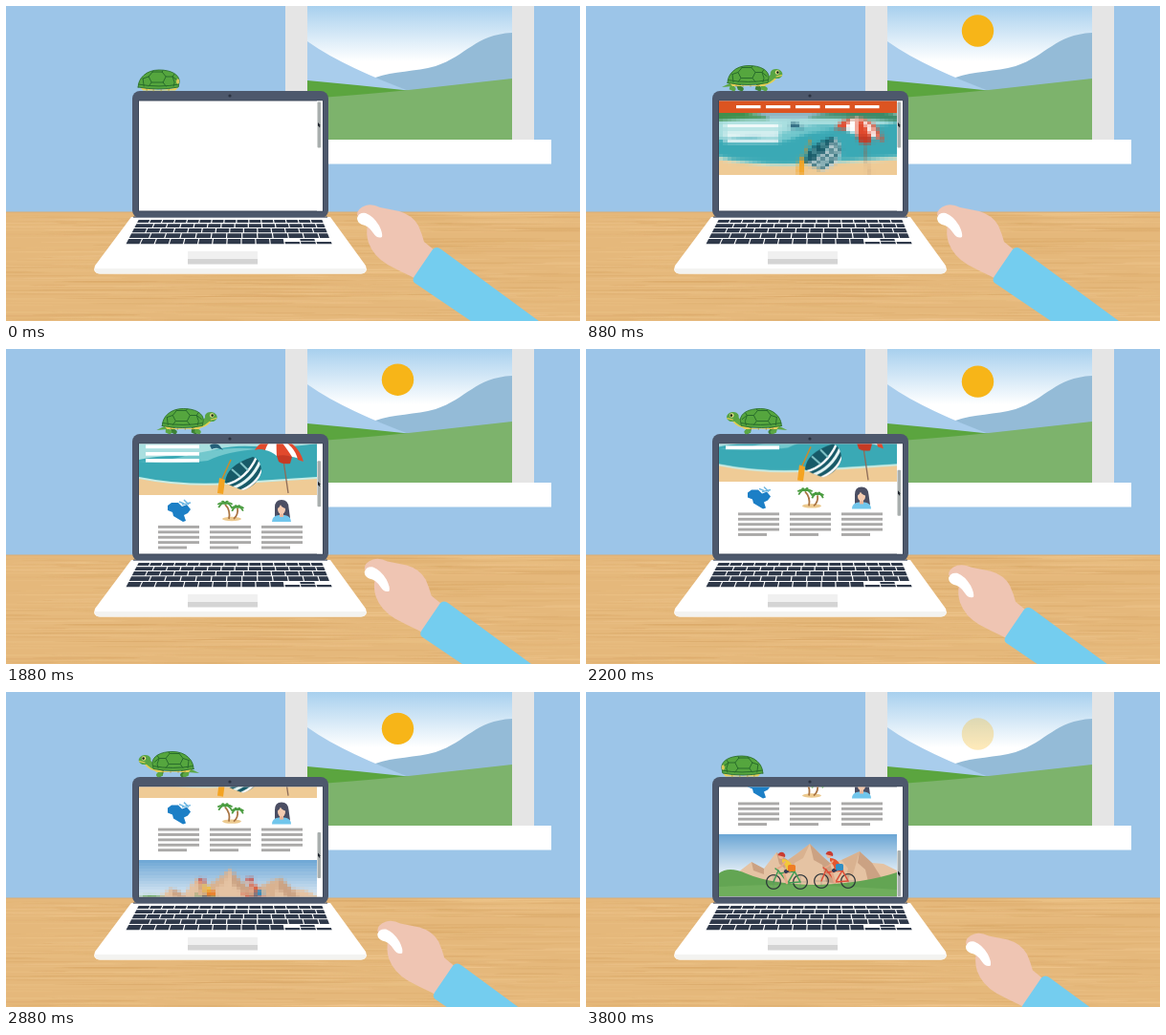
An HTML page with a canvas that plays this animation: 600x330 px, repeating every 3840 ms.

```html
<!DOCTYPE html>
<html lang="en">
<head>
<meta charset="utf-8">
<title>Loading page</title>
<style>
html, body { margin: 0; width: 100%; height: 100%; overflow: hidden; }
canvas { display: block; width: 600px; height: 330px; }
</style>
</head>
<body>
<canvas id="stage" width="600" height="330"></canvas>
<script>
const LOOP = 3840, STEP = 40;
const PIC_W = 186, PIC_H = 65;
const stage = document.getElementById('stage').getContext('2d');

const clamp = v => Math.max(0, Math.min(1, v));
const ramp = (t, from, to) => clamp((t - from) / (to - from));
const ease = v => v * v * (3 - 2 * v);

function makeLayer(w, h) {
  const c = document.createElement('canvas');
  c.width = w;
  c.height = h;
  return c.getContext('2d');
}
function shape(g, path, color) {
  g.fillStyle = color;
  g.fill(new Path2D(path));
}
function line(g, path, color, width) {
  g.strokeStyle = color;
  g.lineWidth = width;
  g.stroke(new Path2D(path));
}
function rect(g, x, y, w, h, color) {
  g.fillStyle = color;
  g.fillRect(x, y, w, h);
}
function oval(g, x, y, rx, ry, color, turn = 0) {
  g.fillStyle = color;
  g.beginPath();
  g.ellipse(x, y, rx, ry, turn, 0, Math.PI * 2);
  g.fill();
}
function box(g, x, y, w, h, r, color) {
  g.fillStyle = color;
  g.beginPath();
  g.roundRect(x, y, w, h, r);
  g.fill();
}
function fade(g, y0, y1, from, to) {
  const f = g.createLinearGradient(0, y0, 0, y1);
  f.addColorStop(0, from);
  f.addColorStop(1, to);
  return f;
}
function seeded(seed) {
  return () => (seed = (seed * 16807) % 2147483647) / 2147483647;
}

// Room without the sun and everything that sits in front of the desk
function paintDesk(g) {
  const rnd = seeded(41);
  rect(g, 0, 216, 600, 114, '#e5b87b');
  for (let i = 0; i < 420; i++) {
    const dark = rnd() < 0.5;
    g.globalAlpha = 0.1 + rnd() * 0.18;
    oval(g, rnd() * 600, 217 + rnd() * 113, 20 + rnd() * 70, 0.4 + rnd() * 0.6,
      dark ? '#cf9a58' : '#f2cd98');
  }
  g.globalAlpha = 1;
  rect(g, 0, 215.5, 600, 1, '#dcae74');
}
function paintRoom(g) {
  rect(g, 0, 0, 600, 216, '#9cc5e8');
  paintDesk(g);
  rect(g, 292, 0, 260, 140, '#e5e5e5');
  rect(g, 292, 140, 278, 25.5, '#ffffff');
  rect(g, 315, 0, 214, 140, fade(g, 0, 58, '#a8d0ee', '#ffffff'));
}
function paintHills(g) {
  shape(g, 'M386 75C405 68 428 69 449 63C482 52 490 30 529 28V100H386Z', '#94bbd7');
  shape(g, 'M315 37C345 58 382 74 421 89L400 100H315Z', '#a9cdec');
  shape(g, 'M315 78Q370 83 425 89L380 100H315Z', '#5ba53f');
  shape(g, 'M315 97Q385 92 430 87T529 76V140H315Z', '#7db36c');
}

function paintLaptop(g) {
  box(g, 132, 89, 205, 133, 8, '#4d586c');
  box(g, 138, 98.5, 194, 117, 1, '#3c4658');
  oval(g, 234, 94, 1.6, 1.6, '#2b3342');
  shape(g, 'M131 221H339L376 272Q379 280 371 280.5H98Q90 280 93 272Z', '#ffffff');
  shape(g, 'M93 275H376.5Q376 280.5 371 280.5H98Q93 280.5 93 275Z', '#f3f3f1');
  rect(g, 133, 220.5, 203, 1.2, '#4d586c');

  const edge = (y, u) => {
    const left = 138 - (y - 224) * 0.52, right = 331 + (y - 224) * 0.4;
    return left + (right - left) * u;
  };
  const key = (y, h, a, b) => {
    const x = (v, u, gap) => (edge(v, u) + gap).toFixed(2);
    shape(g, `M${x(y, a, .6)} ${y}L${x(y, b, -.6)} ${y}L${x(y + h, b, -.6)} ${y + h}L${x(y + h, a, .6)} ${y + h}Z`, '#2f394a');
  };
  [[224, 3, 15], [228.3, 3.7, 14], [233, 4.2, 14], [238.3, 4.6, 13]].forEach(([y, h, n], row) => {
    for (let i = 0; i < n; i++) {
      const shift = i && row % 2 ? 0.025 : 0;
      key(y, h, i / n + shift, Math.min(1, (i + 1) / n + (row % 2 ? 0.025 : 0)));
    }
  });
  for (let i = 0; i < 11; i++) key(244, 5.2, i * 0.07, (i + 1) * 0.07);
  for (let i = 0; i < 3; i++) key(247, 2.2, 0.77 + i * 0.077, 0.77 + (i + 1) * 0.077);
  key(244, 2.2, 0.847, 0.924);

  rect(g, 190, 257, 73, 13, '#f0f0f0');
  rect(g, 190, 265, 73, 5.5, '#d4d4d4');
}

// Pictures on the web page, in their own 186 by 65 space
function paintBeach(g) {
  rect(g, 0, 0, PIC_W, PIC_H, '#a9dfe0');
  rect(g, 0, 0, PIC_W, 5, '#cfe7f0');
  shape(g, 'M40 0H150L162 6H30Z', '#8fb6c4');
  shape(g, 'M0 0H24Q42 1 53 7Q25 6 0 9Z', '#3f8f4d');
  shape(g, 'M92 6Q110 0 128 1Q160 -3 186 2V10Q150 5 92 6Z', '#3c8a68');
  shape(g, 'M0 28Q28 22 58 25Q85 12 120 14T186 11V55H0Z', '#3aa9b5');
  shape(g, 'M50 24Q90 13 125 17Q92 19 72 29Q40 33 0 30Q25 30 50 24Z', '#73c8cd');
  shape(g, 'M0 46Q45 55 92 52T186 46V65H0Z', '#c9ece4');
  shape(g, 'M0 48Q45 57 92 54T186 48V65H0Z', '#efcb96');
  shape(g, 'M74 13Q79 9 84 13L88 18Q81 14 76 17Z', '#245f78');
  [12.5, 20, 27].forEach(y => rect(g, 7, y, 56, 3.7, '#ffffff'));

  line(g, 'M96 28L86 50', '#d28a25', 1.5);
  shape(g, 'M84 47L90 49L88 64L82 63Z', '#f4a321');
  g.save();
  const hull = new Path2D('M90 52Q91 34 119 25Q128 28 128 41Q124 55 109 60Q99 57 90 52Z');
  g.fillStyle = '#175a68';
  g.fill(hull);
  g.clip(hull);
  line(g, 'M91 54Q112 49 123 25', '#ffffff', 2.4);
  line(g, 'M97 58Q118 51 127 29', '#e6f6f5', 3);
  line(g, 'M105 61Q123 54 129 38', '#ffffff', 2.4);
  line(g, 'M97 38L106 46M106 31L114 39', '#82c4c8', 2);
  g.restore();

  line(g, 'M150 22L156 63', '#8d6c58', 1.3);
  const rim = [[121, 18], [132, 18], [144, 24], [160, 25], [172, 30]];
  for (let i = 0; i < 4; i++) {
    const [ax, ay] = rim[i], [bx, by] = rim[i + 1];
    const bend = i * 8 + 127;
    shape(g, `M145 5Q${bend} ${7 + (i > 2 ? 4 : 0)} ${ax} ${ay}Q${(ax + bx) / 2} ${(ay + by) / 2 - 2} ${bx} ${by}Q${bend + 9} 10 145 5Z`,
      i % 2 ? '#ffffff' : '#e2492c');
  }
  shape(g, 'M145 5Q166 9 172 30L166 28Q163 13 145 5Z', '#e2492c');
  shape(g, 'M144 24Q152 22 160 25L158 32Q150 33 146 30Z', '#c63a24');
}

function paintBike(g, x, y, frame, shirt, bag) {
  g.save();
  g.translate(x, y);
  g.lineCap = 'round';
  for (const wx of [0, 28]) {
    g.strokeStyle = '#293238';
    g.lineWidth = 1.2;
    g.beginPath();
    g.arc(wx, 0, 7.3, 0, 7);
    g.stroke();
    line(g, `M${wx - 6} 0H${wx + 6}M${wx} -6V6`, '#6f7f76', 0.35);
  }
  line(g, 'M0 0L5 -12L15 1L22 -11L6 -9M15 1L28 0L22 -11M5 -12L2 -14', frame, 1.4);
  line(g, 'M19 -13L11 -8L14 1', '#e8a988', 2.6);
  line(g, 'M19 -14L13 -11', '#343b55', 4);
  shape(g, 'M9 -24Q18 -24 21 -13L14 -12Q13 -17 9 -21Z', shirt);
  line(g, 'M12 -21L8 -16L4 -14', '#e8a988', 1.6);
  oval(g, 8, -27, 2.7, 3, '#efb594');
  shape(g, 'M4.5 -28Q6 -32 10 -31Q13 -29 12 -26Z', '#c93c31');
  box(g, 15, -18, 8, 7, 2, bag);
  g.restore();
}
function paintRide(g) {
  rect(g, 0, 0, PIC_W, PIC_H, fade(g, 0, 46, '#6ba6d5', '#f4f8fb'));
  shape(g, 'M12 46L34 29L47 36L60 19L72 27L82 20L95 10L108 23L116 30L128 27L147 18L160 30L172 31L186 38V65H12Z', '#e5c3a3');
  shape(g, 'M95 10L99 27L108 32L112 50L122 52L116 30L108 23ZM147 18L145 30L153 37L156 50L170 46L160 30ZM60 19L63 31L70 37L72 27ZM34 29L36 38L47 42V36Z', '#cba283');
  shape(g, 'M95 10L88 25L79 30L76 40L66 42L72 27L82 20ZM128 27L135 36L132 48L140 42L147 18Z', '#d9b290');
  shape(g, 'M0 41Q10 33 28 41Q56 53 104 53Q153 51 186 40V65H0Z', '#63a553');
  shape(g, 'M0 55Q75 50 186 58V65H0Z', '#6fae5c');
  paintBike(g, 57, 50, '#3d9b52', '#f3c83a', '#ef7d25');
  paintBike(g, 107, 49, '#dc4a34', '#e4552f', '#2f8fc5');
}

function makePicture(paint) {
  const g = makeLayer(PIC_W * 2, PIC_H * 2);
  g.scale(2, 2);
  paint(g);
  return g.canvas;
}
const beach = makePicture(paintBeach);
const ride = makePicture(paintRide);
const coarse = makeLayer(PIC_W, PIC_H);

// Shows a picture built from blocks of the given size
function showPicture(g, picture, y, block) {
  g.save();
  g.imageSmoothingQuality = 'high';
  if (block <= 1) {
    g.drawImage(picture, 139, y, PIC_W, PIC_H);
  } else {
    const w = Math.round(PIC_W / block), h = Math.round(PIC_H / (block * 0.7));
    coarse.imageSmoothingQuality = 'high';
    coarse.clearRect(0, 0, PIC_W, PIC_H);
    coarse.drawImage(picture, 0, 0, w, h);
    g.imageSmoothingEnabled = false;
    g.drawImage(coarse.canvas, 0, 0, w, h, 139, y, PIC_W, PIC_H);
  }
  g.restore();
}
function blockSize(t, stages) {
  let size = 0;
  for (const [from, block] of stages) if (t >= from) size = block;
  return size;
}

function paintIcons(g) {
  shape(g, 'M169 188L173 185L180 185L184 189L189 187L193 192L190 196L186 198L188 204L185 205L180 202L175 199L174 195L169 193Z', '#1c7fc6');
  line(g, 'M181 184L186 186M186 182L191 187M184 187L193 185', '#6db7e2', 1.5);

  oval(g, 236, 202, 10, 2.2, '#ecc98e');
  line(g, 'M233 202Q235 193 229 187M238 202Q243 198 242 191', '#a97443', 1.8);
  for (const [x, y, s] of [[229, 186, 1], [242, 190, 0.85]]) {
    for (let i = 0; i < 6; i++) {
      const a = Math.PI * (0.82 + i * 0.27);
      const ex = x + Math.cos(a) * 8 * s, ey = y + Math.sin(a) * 4 * s + 2;
      line(g, `M${x} ${y}Q${(x + ex) / 2} ${Math.min(y, ey) - 2} ${ex} ${ey}`, '#4a9c40', 1.8);
    }
  }

  shape(g, 'M281 201V190Q281 182 288 182Q295 182 295.5 190L297 201Z', '#4b4e63');
  shape(g, 'M278 205Q278 199 285 198H291Q298 199 298 205Z', '#71c6ec');
  rect(g, 286, 195, 4, 5, '#e9b69a');
  oval(g, 288, 192, 4, 5, '#f5cbb0');
  shape(g, 'M283.5 191Q284 186 290 185.5Q292 188 292.5 191Q288 190 287 187Q286 190 283.5 191Z', '#4b4e63');
}

function drawPage(g, t, scroll) {
  g.save();
  g.beginPath();
  g.rect(139, 99.5, 192, 115);
  g.clip();
  rect(g, 139, 99, 192, 116, '#ffffff');
  g.save();
  g.translate(0, -scroll);
  if (t >= 280) {
    rect(g, 139, 99, PIC_W, 13.2, '#dc5421');
    for (let i = 0; i < 5; i++) rect(g, 157 + i * 31, 104, 25.5, 3.2, '#ffffff');
  }
  const beachBlock = blockSize(t, [[400, 16], [600, 9], [760, 4.4], [1080, 2.2], [1320, 1]]);
  if (beachBlock) showPicture(g, beach, 112, beachBlock);
  if (t >= 1080) paintIcons(g);
  if (t >= 1680) {
    for (const x of [159, 213, 267]) {
      for (let i = 0; i < 5; i++) rect(g, x, 209 + i * 5.4, i < 4 ? 43 : 30, 2.9, '#aaa9a8');
    }
  }
  const rideBlock = blockSize(t, [[2320, 14], [2520, 8], [2720, 4.4], [3080, 2], [3360, 1]]);
  if (rideBlock) showPicture(g, ride, 242.5, rideBlock);
  g.restore();

  const slide = scroll * 0.7;
  rect(g, 325, 99, 6, 116, '#ffffff');
  box(g, 325.5, 100.5 + slide, 3.6, 48, 1, '#a9afae');
  g.translate(326, 122 + slide);
  shape(g, 'M0 0L3 3.2H1.8L2.4 5L1.5 5.3L.8 3.6L0 4.3Z', '#1d222b');
  g.restore();
}

function drawTurtle(g, t) {
  const out = ease(ramp(t, 80, 400)) * (1 - ease(ramp(t, 3480, 3760)));
  const left = t < 1950 ? 148 + 0.0153 * (Math.max(t, 235) - 880) : 164.4 - 0.0122 * (t - 1950);
  const facing = Math.cos(Math.PI * ramp(t, 1910, 1990));
  const swing = Math.sin(t / 85) * 2;

  g.save();
  g.translate(left + 21.5, 89);
  g.scale(facing, 1);
  g.translate(-21.5, 0);
  g.lineCap = 'round';
  if (out > 0.02) {
    const leg = (x, step, color) =>
      line(g, `M${x} ${-6 - 2 * out}L${x + step} -3L${x + step + 2} -2.2`, color, 4.5 * out);
    leg(11, -swing, '#3d8135');
    leg(33, swing, '#3d8135');
    leg(6, swing, '#5ca744');
    leg(36, -swing, '#5ca744');
    shape(g, `M4 -9L${4 - 10 * out} -4L6 -5Z`, '#5ca744');
    const hx = 38 + 13 * out, hy = -11 - 7 * out;
    line(g, `M36 -10Q43 -9 ${hx - 2} ${hy + 1}`, '#5ca744', 6.5);
    line(g, `M38 -7Q45 -7 ${hx} ${hy + 4}`, '#e3cf55', 1.7);
    oval(g, hx, hy, 6.4, 5, '#58a443', 0.15);
    line(g, `M${hx} ${hy + 3}L${hx + 5.5} ${hy + 1.6}`, '#e3cf55', 1.2);
    oval(g, hx + 1, hy - 1.5, 2.2, 2.2, '#f0e58b');
    oval(g, hx + 1.4, hy - 1.4, 1.3, 1.3, '#1c2e1d');
  }

  g.translate(0, -4.5 * out);
  shape(g, 'M2 -4Q22 2 42 -4L39 -.5H5Z', '#e6ce57');
  line(g, 'M9 -3V0M16 -3V0M24 -3V0M32 -3V0', '#a3933d', 0.7);
  g.save();
  const shell = new Path2D('M0 -4C0 -13 8 -22 22 -22C35 -22 43 -17 43 -10L42 -4Q21 0 0 -4Z');
  g.fillStyle = '#55a63e';
  g.fill(shell);
  g.clip(shell);
  line(g, 'M0 -7Q22 -3 43 -7M5 -13L11 -15L15 -20L25 -20L29 -15L36 -15L41 -11M11 -15L14 -9L26 -9L29 -15M14 -9L11 -5M26 -9L29 -5M36 -15L38 -9L37 -5M5 -13L6 -5M15 -20V-23M25 -20L27 -23M36 -15L38 -18', '#286c2c', 1);
  g.restore();
  g.strokeStyle = '#2d702e';
  g.lineWidth = 0.9;
  g.stroke(shell);
  if (out < 0.3) oval(g, 41.5, -10, 1.6, 2.8, '#dccb5a');
  g.restore();
}

function drawArm(g, scroll) {
  g.save();
  g.translate(scroll * 0.32, scroll * 0.475);
  shape(g, 'M367 219Q367 212 376 209Q383 207 391 211L411 215Q425 219 431 230Q435 239 437 247L448 256L430 287L423 283Q410 277 399 271Q384 262 379 248Q376 239 378 229Z', '#efc5b3');
  shape(g, 'M367 222Q369 216 376 217Q384 220 390 230Q394 238 393 242Q388 244 384 238Q379 230 372 229Q367 227 367 222Z', '#ffffff');
  shape(g, 'M446 255Q450 251 455 255L580 347H511L427 290Q424 287 427 283Z', '#74cdef');
  g.restore();
}

const room = makeLayer(600, 330);
paintRoom(room);
const front = makeLayer(600, 330);
paintHills(front);
paintLaptop(front);

function draw(t) {
  const scroll = 93.5 * ramp(t, 1313, 3520);
  stage.drawImage(room.canvas, 0, 0);
  stage.globalAlpha = ramp(t, 0, 440) * (1 - ramp(t, 3500, 3930));
  oval(stage, 409.5, 20.6 + t * 0.00616, 16.7, 16.7, '#f7b518');
  stage.globalAlpha = 1;
  stage.drawImage(front.canvas, 0, 0);
  drawPage(stage, t, scroll);
  drawTurtle(stage, t);
  drawArm(stage, scroll);
}

const start = performance.now();
function tick() {
  const t = (performance.now() - start) % LOOP;
  draw(Math.floor(t / STEP) * STEP);
  requestAnimationFrame(tick);
}
tick();
</script>
</body>
</html>
```
